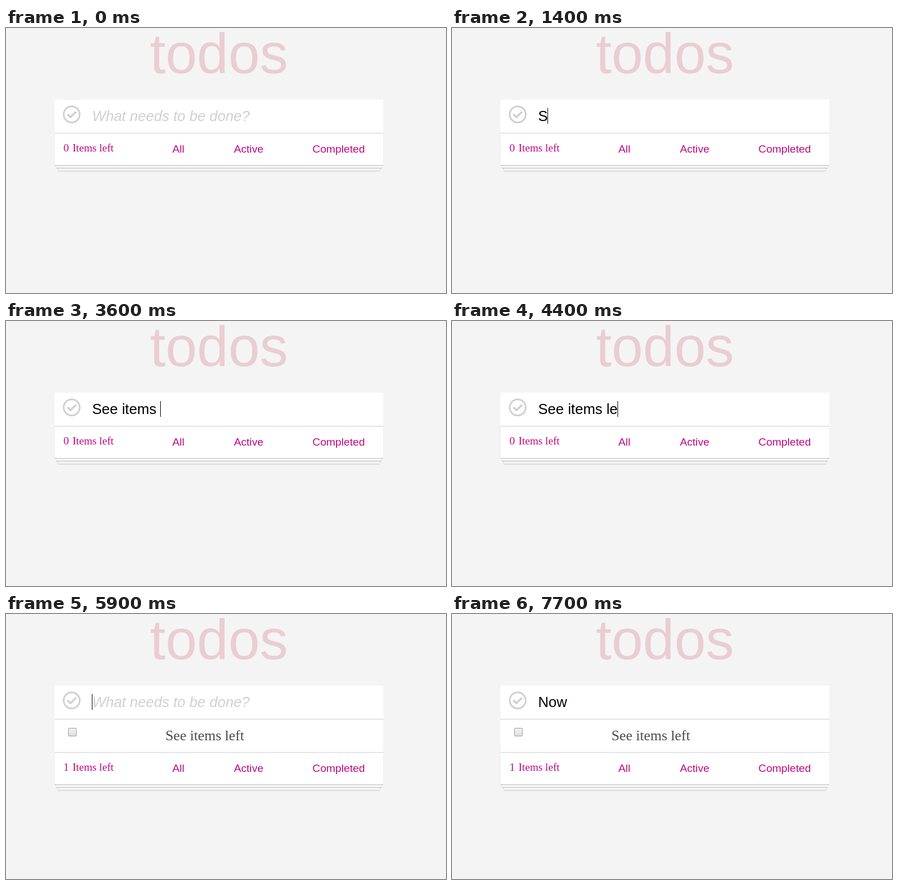
Write an HTML page that moves like this. It is 779x470 px and loops after 8 s.

```html
<!DOCTYPE html>
<html lang="en">
<head>
<meta charset="utf-8">
<title>todos</title>
<style>
  html, body { margin: 0; width: 100%; height: 100%; overflow: hidden; background: #f4f4f4; }
  #stage { position: relative; width: 779px; height: 470px; overflow: hidden; background: #f4f4f4; }
  #stage * { position: absolute; white-space: pre; }
  .sans { font-family: "Liberation Sans", Arial, sans-serif; }
  .serif { font-family: "Liberation Serif", Times, serif; }

  /* Line heights equal ascent plus descent, so each top is baseline minus ascent. */
  #title { left: 254.7px; top: -11px; font-size: 100px; line-height: 112px; color: #e9cdd2; }
  .entry { left: 152.5px; top: 142px; font-size: 25.6px; line-height: 28px; color: #000; }
  #hint { font-style: italic; color: #d0d0d0; }
  #caret { top: 142px; width: 1px; height: 28px; background: #000; }

  #head { left: 86px; top: 127px; width: 582px; height: 59px; background: #fff; }
  .row { left: 86px; width: 582px; background: #fff; border-top: 1px solid #d0d0d0; }
  #item { top: 186px; height: 58px; }
  #item .serif { left: 196.3px; top: 14px; font-size: 25.6px; line-height: 29px; color: #4b4b4b; }
  #box {
    left: 24px; top: 15px; width: 13px; height: 13px;
    border: 1px solid #9f9f9f; border-radius: 2px;
    background: linear-gradient(#ededed 38%, #dcdcdc);
  }

  #foot {
    height: 56px; color: #bd0880; font-size: 19.2px;
    box-shadow: 0 1px 1px rgba(0, 0, 0, .2),
      0 8px 0 -3px #f6f6f6, 0 9px 1px -3px rgba(0, 0, 0, .2),
      0 16px 0 -6px #f6f6f6, 0 17px 2px -6px rgba(0, 0, 0, .2);
  }
  #foot .sans { top: 17px; line-height: 21px; }
  #foot .serif { top: 15px; line-height: 21px; }
  svg { left: 0; top: 0; }
</style>
</head>
<body>
<div id="stage">
  <div id="title" class="sans">todos</div>
  <div id="head"></div>
  <svg width="140" height="180" fill="none" stroke="#d0d0d0">
    <circle cx="116.3" cy="153.3" r="14.2" stroke-width="3"/>
    <path d="M108.8 153 114 158.2 124.2 148.4" stroke-width="3.5" stroke-linejoin="round"/>
  </svg>
  <div id="hint" class="entry sans">What needs to be done?</div>
  <div id="typed" class="entry sans"></div>
  <div id="caret"></div>
  <div id="foot" class="row">
    <span id="count" class="serif" style="left:15.7px">0</span>
    <span class="serif" style="left:31.7px">Items left</span>
    <span class="sans" style="left:208.5px">All</span>
    <span class="sans" style="left:317.4px">Active</span>
    <span class="sans" style="left:456.6px">Completed</span>
  </div>
  <div id="item" class="row">
    <div id="box"></div>
    <span class="serif">See items left</span>
  </div>
</div>
<script>
  const LOOP = 8000, ADDED = 5900, TEXT_X = 152.5;

  // [time, typed text, caret visible]
  const steps = [
    [0, "", 0], [500, "", 1], [1000, "", 0],
    [1400, "S", 1], [1700, "See", 1], [2100, "See ", 1], [2500, "See i", 1],
    [2800, "See it", 1], [3100, "See ite", 1], [3300, "See item", 1],
    [3500, "See items", 1], [3600, "See items ", 1], [4200, "See items ", 0],
    [4300, "See items l", 1], [4400, "See items le", 1], [4700, "See items lef", 1],
    [5000, "See items left", 1], [5500, "See items left", 0],
    [ADDED, "", 1], [6200, "", 0],
    [6600, "N", 1], [6700, "No", 1], [7000, "Now", 1], [7200, "Now ", 1], [7700, "Now ", 0]
  ];

  const el = id => document.getElementById(id);
  const show = (id, on) => { el(id).style.visibility = on ? "visible" : "hidden"; };
  let shown = null;

  function draw(time) {
    const step = steps.findLast(s => s[0] <= time);
    if (step === shown) return;
    shown = step;
    const [start, text, caret] = step;
    const added = start >= ADDED;

    el("typed").textContent = text;
    show("hint", !text);
    show("caret", caret);
    const width = el("typed").getBoundingClientRect().width;
    el("caret").style.left = Math.floor(TEXT_X + width) + "px";

    show("item", added);
    el("count").textContent = added ? 1 : 0;
    el("foot").style.top = (added ? 245 : 186) + "px";
  }

  const origin = performance.now();
  function tick() {
    draw((performance.now() - origin) % LOOP);
    requestAnimationFrame(tick);
  }
  tick();
</script>
</body>
</html>
```
